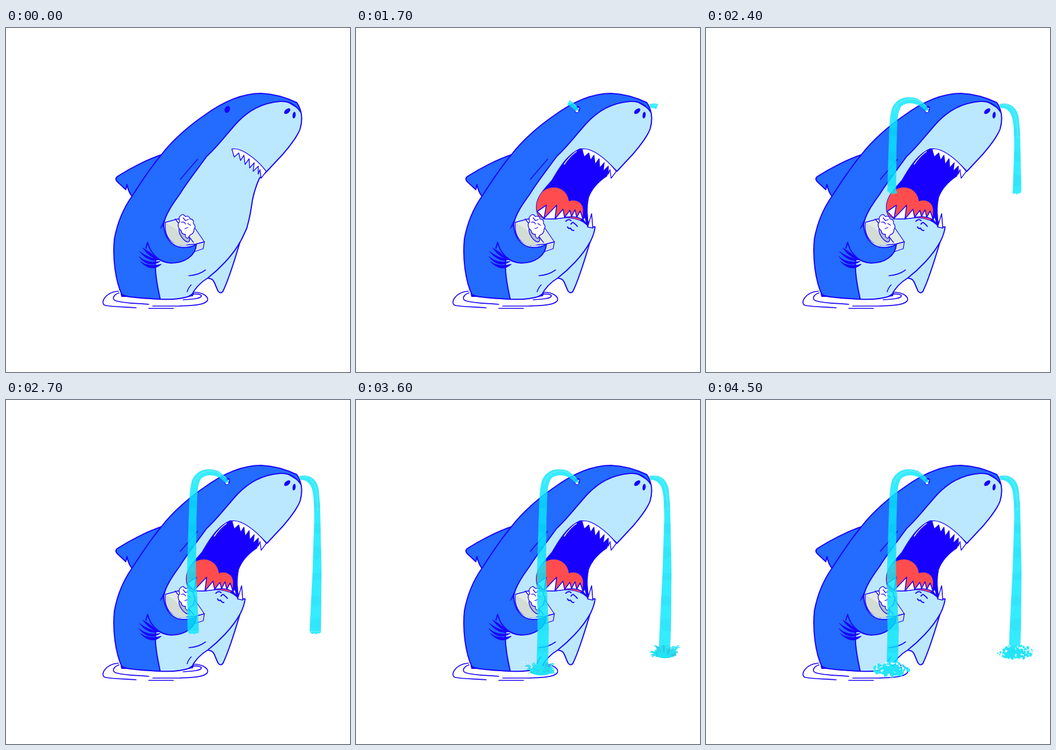
Animation, 600 px wide and 600 px high, one loop 4.6 s. Source, as an HTML page:

```html
<!DOCTYPE html>
<html lang="en">
<head>
<meta charset="utf-8">
<title>Crying shark</title>
<style>
html, body { margin: 0; width: 100%; height: 100%; overflow: hidden; background: #fff; }
svg { display: block; width: 100vw; height: 100vh; }
.ink { stroke: #1a05fa; stroke-width: 2; stroke-linecap: round; stroke-linejoin: round; }
.line { fill: none; }
.back { fill: #246bff; }
.skin { fill: #bbe8ff; }
.dark { fill: #1700ff; }
.white { fill: #fff; }
</style>
</head>
<body>
<svg viewBox="0 0 600 600">
  <defs>
    <clipPath id="mouthClip"><path id="clipShape"/></clipPath>
  </defs>

  <!-- water rings -->
  <path class="ink line" style="stroke-width:1.7" d="M196 459C171 461 163 482 174 484C190 487 207 486 227 488M197 462C187 465 184 474 192 476C210 481 230 480 249 482M249 489H292M256 485L303 485M328 461C346 461 356 471 350 477C342 484 322 484 301 485M309 474C326 473 340 472 341 467Q338 463 326 464"/>

  <!-- fins -->
  <path class="ink back" d="M271 221C245 230 214 246 193 260Q190 264 194 268L209 282L211 273Q213 285 220 294Z"/>
  <path class="ink skin" d="M408 374C400 400 390 436 378 460Q374 464 370 459C362 444 365 437 350 436Z"/>

  <path id="belly" class="ink skin"/>
  <path class="ink back" d="M203 467C190 440 186 400 189 368C195 335 208 310 220 293C238 265 255 240 271 221C290 196 320 170 345 153C375 131 410 114 445 114C470 115 490 122 507 130C511 135 513 140 514 147C505 133 492 127 478 128C444 131 423 145 405 163C388 181 370 206 350 224C335 245 315 270 303 290C290 308 278 325 275 342C270 370 262 380 261 404C259 425 264 450 269 473C245 472 222 470 203 467Z"/>
  <path class="ink line" style="stroke-width:1.6" d="M304 264L334 229M267 355L276 336M319 432Q336 431 348 422M316 460Q318 453 323 448"/>
  <path class="ink dark" d="M201 464Q206 467 212 468L202 468ZM320 467L327 463L325 467Z"/>
  <ellipse class="dark" cx="490.5" cy="145" rx="6.4" ry="3.6" transform="rotate(-40 490.5 145)"/>
  <ellipse class="dark" cx="502.5" cy="152" rx="2.7" ry="5.8" transform="rotate(8 502.5 152)"/>
  <ellipse class="dark" cx="386" cy="142" rx="4.4" ry="6.2" transform="rotate(22 386 142)"/>
  <g id="glint" class="white"><ellipse cx="385.3" cy="144.3" rx="2.7" ry="2.6"/><circle cx="388" cy="140.5" r="1.3"/></g>

  <!-- mouth -->
  <g id="mouth">
    <path id="cavity" class="ink dark"/>
    <g clip-path="url(#mouthClip)">
      <g class="jaw">
        <path class="ink" fill="#ff4d4f" d="M314 340V308C315 288 330 277 346 277C361 278 370 288 372 301C383 297 396 303 397 317L396 334L380 340Z"/>
      </g>
      <path fill="none" stroke="#fff" stroke-width="1.4" d="M363 238Q373 223 385 215"/>
    </g>
    <g class="jaw">
      <path class="ink white" style="stroke-width:1.6" d="M316 320L332 309L328 332ZM327 333L350 309L347 333ZM347 333L361 316L364 331ZM364 330L373 318L376 329ZM376 329L382 317L385 330ZM385 330L391 319L396 334ZM396 334L399 329L403 343ZM404 347L411 324L413 349Z"/>
      <path class="ink line" d="M366 337Q371 332 375 336M375 342Q378 337 381 341Q384 343 386 346M369 347Q371 351 374 349Q377 354 380 353" stroke-width="1.3"/>
    </g>
  </g>
  <path class="ink white" style="stroke-width:1.4" d="M394 211L398 225L406 218L409 231L415 222L417 238L424 228L425 244L433 235L431 250L440 241L440 255L443 247L445 262L454 250C436 227 410 208 394 211Z"/>

  <!-- tissue box and arm -->
  <g class="ink" style="stroke-width:1.3">
    <path fill="#e0ebe6" d="M278 339L300 333L322 338L346 373L331 377L304 379C283 373 276 360 278 339Z"/>
    <path fill="#d3dcd5" stroke="none" d="M279 340L296 351L318 377Q308 382 298 378C284 371 278 360 279 340Z"/>
    <path class="line" d="M295 333L327 374"/>
    <path fill="#cfdfe0" d="M331 377L346 373L344 385L329 390Z"/>
    <ellipse fill="#aebfc6" cx="311" cy="361" rx="6" ry="14" transform="rotate(-34 311 361)"/>
    <path class="white" d="M302 350Q298 342 303 338Q300 330 305 327Q309 323 313 329Q319 326 321 333Q328 333 327 341Q332 346 328 351Q328 359 321 361L317 367Q312 365 313 360Q306 360 306 354Z"/>
    <path class="line" d="M306 339Q311 337 313 342M309 331L313 336L318 334M312 350L317 348M317 341L322 344"/>
  </g>
  <path class="back" d="M275 346C277 367 289 382 308 384C321 383 328 380 332 377C331 397 312 410 288 410C268 409 252 395 246 374L262 355Z"/>
  <path class="ink line" d="M275 340C275 365 289 382 308 383C321 383 328 380 332 377C331 397 312 410 288 410C268 409 253 396 247 374L244 384"/>
  <path class="ink dark" style="stroke-width:1" d="M239 384Q252 391 264 403Q249 399 239 384ZM233 390Q249 402 268 404Q249 410 233 390ZM232 399Q247 412 269 407Q249 420 232 399ZM235 408Q249 418 271 412Q254 427 235 408Z"/>

  <g id="tears"></g>
</svg>
<script>
const $ = id => document.getElementById(id);
const clamp = x => Math.max(0, Math.min(1, x));

// blends two path strings of the same structure
const mix = (a, b, k) => {
  const to = b.match(/-?[\d.]+/g);
  let i = 0;
  return a.replace(/-?[\d.]+/g, n => +n + (to[i++] - n) * k);
};

const cavityShut = "M394 211C398 211 402 211 405 212C410 213 412 214 416 216C424 219 428 222 434 229C440 235 443 240 443 244C443 244 443 244 443 244C443 244 443 244 443 244L441 240C430 226 410 208 394 211Z";
const cavityOpen = "M391 211C372 219 358 238 342 266C328 282 308 300 317 325C322 333 340 334 352 332C370 328 395 332 406 347C402 330 402 310 405 296C410 282 422 268 437 258L441 240C430 226 408 210 391 211Z";
const edgeShut = "L442 262C434 280 430 295 428 312C426 325 424 335 421 345L420 349C416 358 412 367 409 372";
const edgeOpen = "L437 258C422 268 410 282 405 296C402 310 402 330 406 347L417 347C416 356 412 366 409 372";
const bellyPath = (edge, inset) => `M513 142C517 152 516 165 513 176C508 190 495 206 483 220L455 250L${455 - inset} ${250 - inset}` + edge +
  "C395 398 370 422 352 436C335 446 328 457 323 467C305 473 285 474 269 473L240 440L260 330L400 140L480 122Z";

let seed = 7;
const rnd = (a, b) => {
  seed = (seed * 16807) % 2147483647;
  return a + (b - a) * seed / 2147483647;
};
const repeat = (n, make) => Array.from({ length: n }, (_, i) => make(i)).join("");

// a pool of short curved spikes, and a foamy one made of drops
const spikes = (x, y) =>
  `<ellipse cx="${x}" cy="${y + 2}" rx="20" ry="8.5" fill="#22e3f7"/>` +
  repeat(75, () => {
    const a = rnd(-1, 1), r = rnd(16, 28), h = rnd(-12, 8);
    return `<path d="M${x + a * r * .7} ${y + 2 + h * .3}Q${x + a * r * .85} ${y + h - 2} ${x + a * r} ${y + h}" fill="none" stroke="${rnd(0, 1) < .25 ? "#35c6dc" : "#25e5f8"}" stroke-width="${rnd(.8, 2.4)}" stroke-linecap="round"/>`;
  });
const foam = (x, y) =>
  `<ellipse cx="${x}" cy="${y + 2}" rx="23" ry="8.5" fill="#22e3f7"/>` +
  repeat(130, i => {
    const a = rnd(0, 6.28), r = Math.sqrt(rnd(.2, 1));
    return `<circle cx="${x + Math.cos(a) * r * 32}" cy="${y + Math.sin(a) * r * 12}" r="${rnd(.8, 2.5)}" fill="${i % 4 < 3 ? "#25e5f8" : "#eaffff"}"/>`;
  });

const streams = [
  { x: 323, y: 470, end: 474, tip: [326, 327],
    mid: "M388 143C375 118 336 116 328 147C324 168 326 188 326 206V480",
    shape: "M384 146C372 129 350 127 340 137C331 151 334 175 332 205L331 300L336 400L334 474H315L317 400L316 300L319 205C320 180 320 158 324 143C331 120 354 118 370 124Q381 131 389 142Z" },
  { x: 539, y: 440, end: 447, tip: [543, 540],
    mid: "M511 135C532 130 541 145 543 175L544 206V480",
    shape: "M512 133C528 129 542 137 545 156Q548 180 548 208L550 300L549 400L547 447H528L530 400L535 300L538 208C538 180 537 160 532 150Q525 138 514 139Z" }
];

$("tears").innerHTML = streams.map((s, i) => `
  <mask id="m${i}" maskUnits="userSpaceOnUse" x="0" y="0" width="600" height="600">
    <path id="cut${i}" d="${s.mid}" fill="none" stroke="#fff" stroke-width="34"/>
  </mask>
  <clipPath id="c${i}"><path d="${s.shape}"/></clipPath>
  <g opacity=".82">
    <g mask="url(#m${i})">
      <path d="${s.shape}" fill="#08e8ff" stroke="#1fd9ee" stroke-width=".7"/>
      <g clip-path="url(#c${i})" fill="#00d6f0" opacity=".4">
        ${repeat(7, n => `<ellipse cx="${s.tip[1] - 1 + n % 2 * 3}" cy="${182 + n * 42}" rx="12" ry="${7 + n % 3 * 2}"/>`)}
      </g>
      <path d="${s.mid}" fill="none" stroke="#62e9ec" stroke-width="2" stroke-dasharray="4 3 9 2 60 900" opacity=".6"/>
    </g>
    <path id="tip${i}" d="M-7 -2L-6 1Q-4 4 -2 1Q1 5 3 1Q6 3 7 -2Z" fill="#08e8ff"/>
  </g>
  <g id="spikes${i}">${spikes(s.x, s.y)}${i ? "" : repeat(9, () => `<circle cx="${rnd(287, 308)}" cy="${rnd(456, 467)}" r=".9" fill="#dffaff"/>`)}</g>
  <g id="foam${i}">${foam(s.x, s.y)}</g>`).join("");

// length of the curved part, before the straight drop from 206 to 480
streams.forEach((s, i) => s.arc = $("cut" + i).getTotalLength() - 274);

const show = (id, on) => $(id).style.display = on ? "" : "none";

function draw(step) {
  // the eye wells up in two goes
  const wet = step < 4 ? Math.min(step, 3) * .2 : .6 + clamp((step - 4) / 5) * .4;
  $("glint").setAttribute("transform", `translate(385.5 144.5) scale(${wet}) translate(-385.5 -144.5)`);

  const open = clamp((step - 12) / 4), shut = 1 - open;
  const cavity = mix(cavityShut, cavityOpen, open);
  $("cavity").setAttribute("d", cavity);
  $("clipShape").setAttribute("d", cavity);
  $("belly").setAttribute("d", bellyPath(mix(edgeShut, edgeOpen, open), open * 11));
  for (const j of document.querySelectorAll(".jaw"))
    j.setAttribute("transform", `translate(${shut * 58} ${shut * -96}) rotate(${shut * 25} 362 332) scale(1 ${1 - shut * .3})`);
  show("mouth", open > 0);

  streams.forEach((s, i) => {
    const fall = Math.min(s.end, 206 + Math.max(0, step - 22) * 39.5);
    const length = step < 22 ? s.arc * clamp((step - 16) / 6) : s.arc + fall - 206;
    $("cut" + i).setAttribute("stroke-dasharray", `${length} 999`);
    show("cut" + i, length > 0);
    const p = Math.min(1, (fall - 206) / 200);
    const x = s.tip[0] + (s.tip[1] - s.tip[0]) * p;
    $("tip" + i).setAttribute("transform", `translate(${x} ${fall + 2}) scale(${.9 + p * .5} 1)`);
    show("tip" + i, step >= 22 && fall < s.end);
    const splash = step >= 30;
    show("spikes" + i, splash && step % 2 === 0);
    show("foam" + i, splash && step % 2 === 1);
  });
}

let last = -1;
const start = performance.now();
function tick() {
  const step = Math.floor((performance.now() - start) % 4600 / 100);
  if (step !== last) draw(last = step);
  requestAnimationFrame(tick);
}
tick();
</script>
</body>
</html>
```
